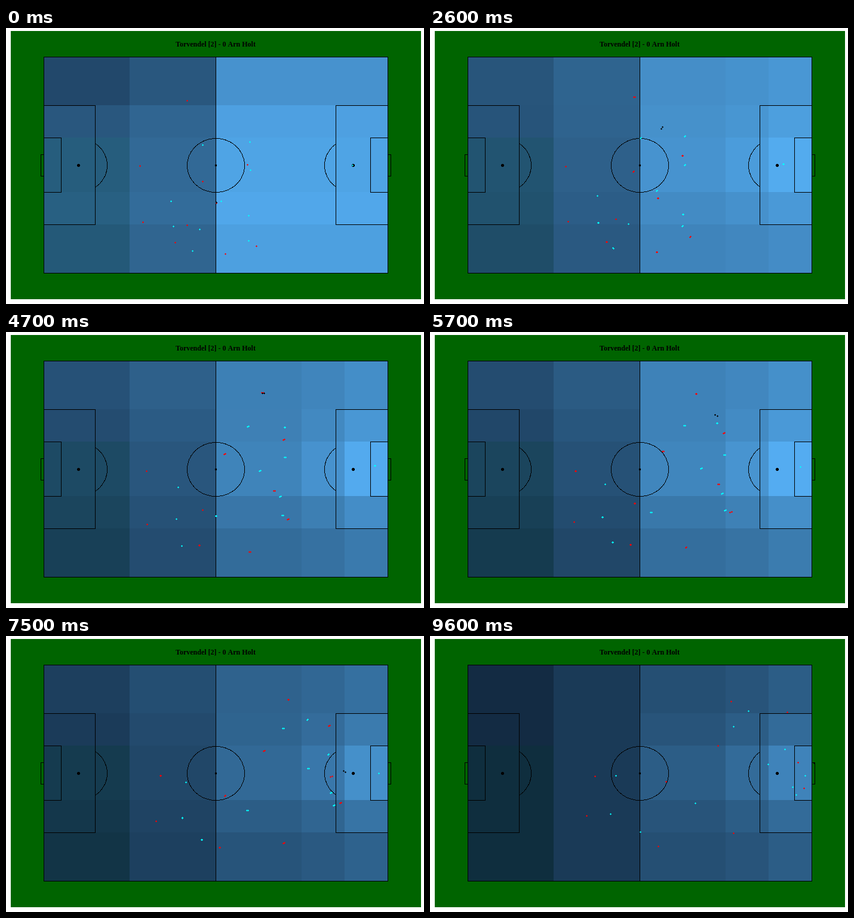
An HTML page with a canvas that plays this animation: 700x461 px, repeating every 10 s.

```html
<!DOCTYPE html>
<html>
<head>
<meta charset="utf-8">
<style>
html, body { margin: 0; width: 100%; height: 100%; overflow: hidden; background: #fff; }
canvas { display: block; }
</style>
</head>
<body>
<canvas id="stage" width="700" height="461"></canvas>
<script>
const ctx = document.getElementById('stage').getContext('2d');
const LOOP = 10000, STEP = 100, SAMPLE = 400, MID = 4700, END = 9600;
const KEYS = [0, 1400, 2600, MID, 6800, 7500, END];
const COLS = [63, 207, 351, 495, 567, 639];
const ROWS = [48, 129, 183, 274, 328, 409];
const LOW = [19, 43, 67], HIGH = [86, 177, 247], TEAL = [-4, 3, -5];
const FAR_LEVEL = [.9, .95, .68, .5, .53, .3, .21];
const BALL_X = [352, 348, 388, 430, 533, 567, 643];
const BALL_Y = [291, 240, 166, 101, 181, 227, 212];

const mix = (a, b, u) => a + (b - a) * u;

function smooth(u) {
  u = Math.max(0, Math.min(1, u));
  return u * u * (3 - 2 * u);
}

// Linear interpolation of values given at the key times
function keyed(vals, t) {
  let i = 0;
  while (i < KEYS.length - 2 && t >= KEYS[i + 1]) i++;
  return mix(vals[i], vals[i + 1], (t - KEYS[i]) / (KEYS[i + 1] - KEYS[i]));
}

// Players gather speed up to the middle, then run on evenly.
function run(x0, y0, x1, y1, x2, y2) {
  return t => {
    if (t < MID) {
      const u = (t / MID) ** 2;
      return [mix(x0, x1, u), mix(y0, y1, u)];
    }
    const u = (t - MID) / (END - MID);
    return [mix(x1, x2, u), mix(y1, y2, u)];
  };
}

// Each run: start, middle, end
const reds = [
  run(303, 121, 430, 101, 504, 109),
  run(224, 230, 235, 232, 276, 234),
  run(404, 228, 465, 179, 598, 127),
  run(329, 256, 366, 203, 482, 183),
  run(352, 292, 449, 265, 616, 211),
  run(229, 324, 236, 321, 262, 300),
  run(303, 329, 329, 297, 395, 243),
  run(283, 358, 324, 356, 382, 351),
  run(367, 377, 408, 367, 508, 329),
  run(419, 364, 472, 312, 626, 254)
];
const blues = [
  run(329, 195, 405, 157, 508, 151),
  run(408, 190, 467, 159, 533, 125),
  run(409, 237, 467, 209, 594, 189),
  run(360, 289, 425, 231, 566, 214),
  run(276, 289, 288, 259, 311, 233),
  run(280, 331, 285, 312, 302, 297),
  run(324, 336, 351, 307, 444, 279),
  run(312, 372, 294, 357, 352, 327),
  run(406, 313, 463, 306, 613, 265),
  run(406, 355, 459, 274, 607, 252),
  run(580, 229, 618, 223, 628, 233)
];
const ball = t => [keyed(BALL_X, t), keyed(BALL_Y, t)];

// Zone value: own half fades steadily, far half peaks around the right goal.
function zone(c, r, t) {
  const u = t / END, side = Math.abs(r - 2);
  const tilt = (.05 * (1 - u) - .1 * Math.sin(Math.PI * u)) * (r - 2) / 2;
  const edge = side === 2 ? Math.max(0, .08 - .25 * u) : 0;
  if (c < 2) return .46 - .35 * u ** 1.3 - (c ? 0 : .11) + tilt - edge;
  const peak = .45 * smooth((u - .1) / .3) * .6 ** (4 - c + side);
  return keyed(FAR_LEVEL, t) + peak + tilt - edge;
}

function drawHeat(t) {
  for (let c = 0; c < 5; c++) for (let r = 0; r < 5; r++) {
    const v = Math.max(0, Math.min(1, zone(c, r, t)));
    const teal = c === 0 && r > 1;
    const rgb = LOW.map((low, k) => Math.round(mix(low, HIGH[k], v) + (teal ? TEAL[k] : 0)));
    ctx.fillStyle = `rgb(${rgb})`;
    ctx.fillRect(COLS[c], ROWS[r], COLS[c + 1] - COLS[c], ROWS[r + 1] - ROWS[r]);
  }
}

const box = (x1, y1, x2, y2) => ctx.strokeRect(x1 + .5, y1 + .5, x2 - x1, y2 - y1);

// Hard-edged curve, plotted pixel by pixel
function arc(x, rx, ry, from = 0, to = 2 * Math.PI) {
  for (let a = from; a <= to; a += 1 / 48)
    ctx.fillRect(Math.round(x + rx * Math.cos(a)), Math.round(229 + ry * Math.sin(a)), 1, 1);
}

function drawLines() {
  const bend = .93;
  ctx.strokeStyle = ctx.fillStyle = '#000';
  ctx.lineWidth = 1;
  box(63, 48, 639, 409);
  box(63, 48, 351, 409);
  box(63, 129, 149, 328);
  box(552, 129, 639, 328);
  box(63, 183, 92, 274);
  box(610, 183, 639, 274);
  box(58, 211, 63, 247);
  box(639, 211, 644, 247);
  arc(351, 48, 45);
  arc(121, 48, 45, -bend, bend);
  arc(581, 48, 45, Math.PI - bend, Math.PI + bend);
  arc(351, 1.4, 1.4);
  for (const x of [121, 581]) for (let r = 0; r <= 2; r++) arc(x, r, r);
}

function drawDot(pos) {
  const [x, y] = pos.map(Math.round);
  ctx.fillRect(x - 1, y, 3, 1);
  ctx.fillRect(x, y - 1, 1, 3);
}

// Dots are doubled along their path between samples.
function drawDots(paths, color, t) {
  const times = t % SAMPLE ? [t - 35, t + 35] : [t];
  ctx.fillStyle = color;
  for (const path of paths) times.forEach(s => drawDot(path(s)));
}

function draw(now) {
  const t = Math.min(END, Math.floor(now % LOOP / STEP) * STEP);
  ctx.fillStyle = '#fff';
  ctx.fillRect(0, 0, 700, 461);
  ctx.fillStyle = '#006400';
  ctx.fillRect(8, 5, 687, 448);
  ctx.fillStyle = '#000';
  ctx.font = 'bold 12px "Liberation Serif", serif';
  ctx.textAlign = 'center';
  ctx.fillText('Torvendel [2] - 0 Arn Holt', 351, 31);
  drawHeat(t);
  drawLines();
  drawDots(reds, '#f00', t);
  drawDots(blues, '#0ff', t);
  drawDots([ball], '#000', t);
}

const start = performance.now();
function tick() {
  draw(performance.now() - start);
  requestAnimationFrame(tick);
}
tick();
</script>
</body>
</html>
```
